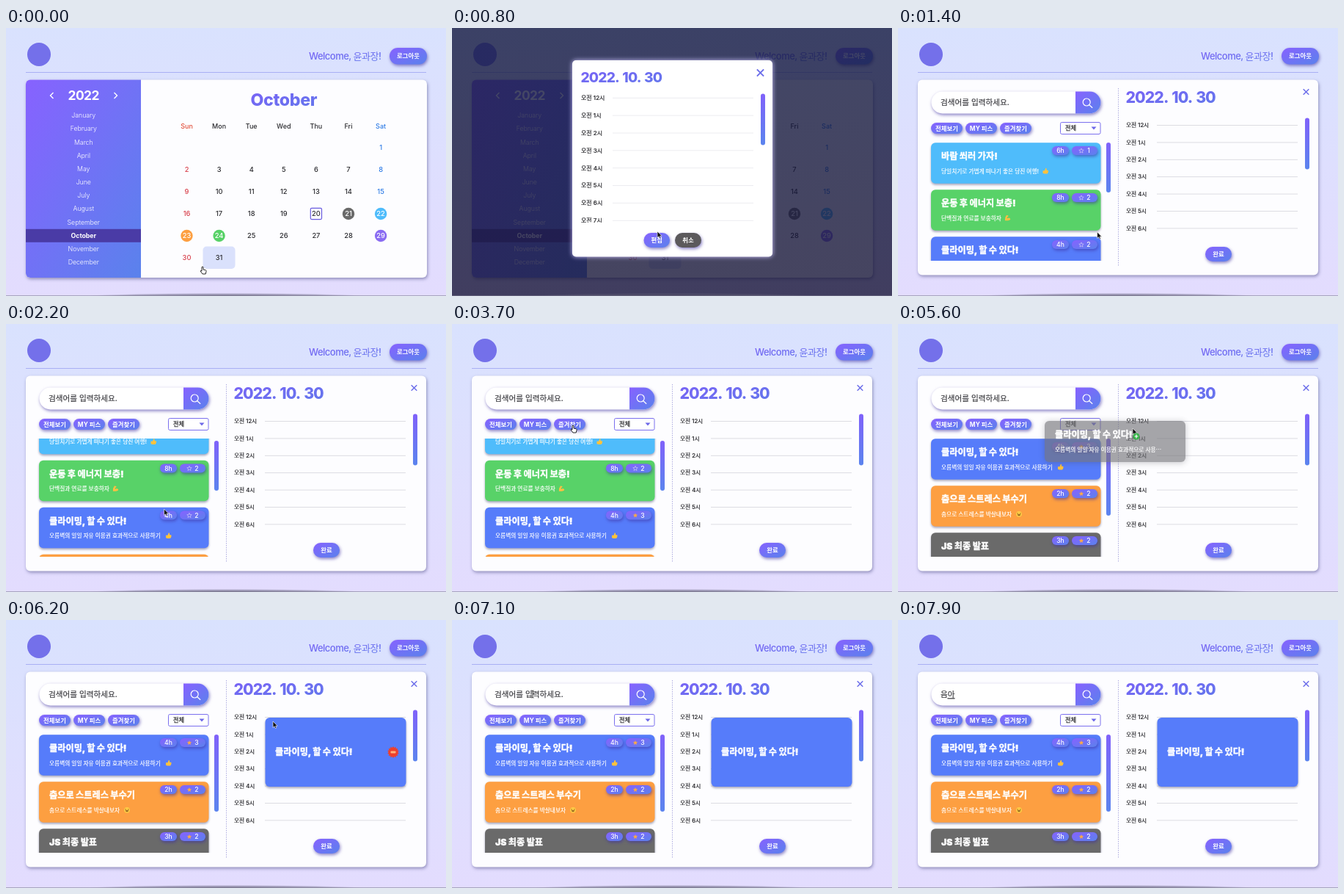
Write an HTML page that moves like this. It is 600 px wide and 365 px high and loops after 8000 ms.

```html
<!DOCTYPE html>
<html lang="ko">
<head>
<meta charset="utf-8">
<title>Planner</title>
<style>
html, body { margin: 0; width: 100%; height: 100%; overflow: hidden; }
body { background: linear-gradient(#d9e2fe, #e3dcfe); }
svg { display: block; position: absolute; left: 0; top: 0; }
text { font-family: Inter, "Noto Sans CJK KR", sans-serif; }
.lift { filter: drop-shadow(1.5px 2px 2.2px rgba(60, 45, 160, .6)); }
.card { filter: drop-shadow(0 2px 1.5px rgba(40, 40, 90, .4)); }
.panel { filter: drop-shadow(1px 2px 2px rgba(60, 60, 120, .5)); }
.glow { filter: drop-shadow(0 0 3px #cfc6ff); }
.haze { filter: drop-shadow(0 1px 4px rgba(60, 60, 70, .45)); }
.date { word-spacing: .1em; }
</style>
</head>
<body>
<svg id="stage" width="600" height="365" viewBox="0 0 600 365"></svg>
<script>
const LOOP = 8000;
const GRAD = 'url(#brand)', INK = '#2c2c30', USER = '윤과장';
const BLUE = '#567cfa', ORANGE = '#fd9f41', GRAY = '#6a6a6a', GREEN = '#58d268', SKY = '#4fbcfb';

const rect = (x, y, w, h, r, fill, more = '') =>
  `<rect x="${x}" y="${y}" width="${w}" height="${h}" rx="${r}" fill="${fill}" ${more}/>`;
const circle = (x, y, r, fill, more = '') =>
  `<circle cx="${x}" cy="${y}" r="${r}" fill="${fill}" ${more}/>`;
const path = (d, stroke, width = 1, more = '') =>
  `<path d="${d}" fill="none" stroke="${stroke}" stroke-width="${width}" ${more}/>`;
const shape = (d, fill, more = '') => `<path d="${d}" fill="${fill}" ${more}/>`;
const group = (body, more = '') => `<g ${more}>${body}</g>`;
// Text is placed by its optical middle line.
const text = (x, mid, str, size, weight = 400, fill = INK, anchor = 'start', gap = 0, more = '') =>
  `<text x="${x}" y="${mid + size * .36}" font-size="${size}" font-weight="${weight}" fill="${fill}" ` +
  `text-anchor="${anchor}" letter-spacing="${gap}" ${more}>${str}</text>`;
const label = (x, mid, str, size, weight, fill, gap) => text(x, mid, str, size, weight, fill, 'middle', gap);
// A thin outline gives Hangul the in-between weights.
const heavy = (x, mid, str, size, weight, fill, edge) =>
  text(x, mid, str, size, weight, fill, 'start', 0, `stroke="${fill}" stroke-width="${edge}"`);
const title = (x, mid, str) => heavy(x, mid, str, 12.2, 900, '#fff', .4);
const note = (x, mid, str) => heavy(x, mid, str, 7.7, 500, '#fff', .2);
const dateTitle = (x, mid, size) =>
  text(x, mid, '2022. 10. 30', size, 800, 'url(#head)', 'start', -size * .045, 'class="date"');
const pill = (x, y, w, h, str, size = 8.4, fill = GRAD) =>
  group(rect(x, y, w, h, h / 2, fill), 'class="lift"') + label(x + w / 2, y + h / 2, str, size, 700, '#fff');
const cross = (x, y, r, w) =>
  path(`M${x - r} ${y - r}l${2 * r} ${2 * r}M${x + r} ${y - r}l${-2 * r} ${2 * r}`, '#6c6eea', w);
const thumb = (x, y, h) => rect(x, y, 6, h, 3, 'url(#bar)');

function star(x, y, outer, inner, points) {
  let d = '';
  for (let i = 0; i < points * 2; i++) {
    const a = Math.PI * i / points - Math.PI / 2, r = i % 2 ? inner : outer;
    d += `${i ? 'L' : 'M'}${(x + r * Math.cos(a)).toFixed(2)} ${(y + r * Math.sin(a)).toFixed(2)}`;
  }
  return d + 'Z';
}

const emoji = {
  thumb: shape('M-3.5-.5H-1L.4-4Q2-4 1.5-1H3.6Q4.4 0 3.8 1.6L2.6 3.8H-1.4L-3.5 3Z', '#ffc23c'),
  arm: shape('M-3.6 3.4Q-4-1-1.6-3.8L1-3.4.6-1.8-.8-1.4-.4.6Q2.4-1.4 3.8 1.4 3 3.8-3.6 3.4Z', '#ffbf42'),
  face: circle(0, 0, 3.9, '#ffcb45') + path('M-2.4-1l1.4.6M2.4-1L1-.4M-1.8 1q1.8 2.4 3.6 0Z', '#6b4316', .8)
};

const hours = (x, y, step, n, size, x1, x2, line) => Array.from({ length: n }, (_, i) =>
  heavy(x, y + i * step, `오전 ${i || 12}시`, size, 500, INK, .2) +
  path(`M${x1} ${y + i * step}H${x2}`, line)).join('');

function badges(y, time, likes, liked) {
  const s = star(250, y + 6.2, 3.4, 1.5, 5);
  return group(rect(210, y, 23, 12, 6, GRAD) + rect(237, y, 35, 12, 6, GRAD), 'class="lift"') +
    label(221.5, y + 6, time, 8.6, 500, '#fff') +
    (liked ? shape(s, '#f8a84a') : path(s, '#cfc8f5', .7)) +
    label(260, y + 6, likes, 8.6, 500, '#fff');
}

function card(y, c, liked = c.liked) {
  const likes = c.likes + (liked && !c.liked ? 1 : 0);
  return group(rect(45, y, 231.5, 55.5, 6, c.fill), 'class="card"') +
    title(59, y + 18.5, c.title) + note(59, y + 38.8, c.sub) +
    group(emoji[c.icon], `transform="translate(${c.ix} ${y + 38.5})"`) +
    badges(y + 4.8, c.time, likes, liked);
}

const CLIMB = '클라이밍, 할 수 있다!', CLIMB_SUB = '오름벽의 일일 자유 이용권 효과적으로 사용';
const cards = [
  { fill: SKY, title: '바람 쐬러 가자!', sub: '당일치기로 가볍게 떠나기 좋은 당진 여행!', icon: 'thumb', ix: 201, time: '6h', likes: 1 },
  { fill: GREEN, title: '운동 후 에너지 보충!', sub: '단백질과 연료를 보충하자', icon: 'arm', ix: 149.5, time: '8h', likes: 2 },
  { fill: BLUE, title: CLIMB, sub: CLIMB_SUB + '하기', icon: 'thumb', ix: 221.5, time: '4h', likes: 2 },
  { fill: ORANGE, title: '춤으로 스트레스 부수기', sub: '춤으로 스트레스를 박살내보자', icon: 'face', ix: 165, time: '2h', likes: 2, liked: true },
  { fill: GRAY, title: 'JS 최종 발표', sub: '마지막까지 힘내자', icon: 'arm', ix: 130, time: '3h', likes: 2, liked: true }
];

const defs = `<defs>
  <linearGradient id="brand" x1="0" y1="0" x2="1" y2="1"><stop stop-color="#8762ff"/><stop offset="1" stop-color="#5a82ec"/></linearGradient>
  <linearGradient id="bar" x1="0" y1="0" x2="0" y2="1"><stop stop-color="#8062fa"/><stop offset="1" stop-color="#5b84ee"/></linearGradient>
  <linearGradient id="head" x1="0" y1="0" x2="1" y2="1"><stop stop-color="#7a62f6"/><stop offset="1" stop-color="#6278ec"/></linearGradient>
  <linearGradient id="dim" x1="0" y1="0" x2="0" y2="1"><stop stop-color="#141940" stop-opacity=".8"/><stop offset="1" stop-color="#181638" stop-opacity=".8"/></linearGradient>
  <radialGradient id="dock"><stop stop-color="#45435a" stop-opacity=".7"/><stop offset=".75" stop-color="#5c5a72" stop-opacity=".4"/><stop offset="1" stop-color="#77758c" stop-opacity="0"/></radialGradient>
  <clipPath id="listClip"><rect x="38" y="156" width="243" height="161"/></clipPath>
  <clipPath id="hourClip"><rect x="170" y="86" width="245" height="179"/></clipPath>
  <clipPath id="panelClip"><rect x="27" y="70.5" width="547" height="269.5" rx="6"/></clipPath>
</defs>`;

const header = circle(45, 36, 16, '#7470ea') +
  text(413, 38.3, `Welcome, ${USER}!`, 13, 500, 'url(#head)', 'start', -.5) +
  pill(523, 27, 51, 22.5, '로그아웃', 8.4) +
  path('M27 60.5H573', '#a9b0f4');

function calendar() {
  const months = 'January February March April May June July August September October November December'.split(' ');
  const days = 'Sun Mon Tue Wed Thu Fri Sat'.split(' ');
  const dots = { 21: GRAY, 22: SKY, 23: ORANGE, 24: GREEN, 29: '#8a6cf2' };
  const colX = i => 246.5 + 44.1 * i;
  const tint = i => i === 0 ? '#d8404c' : i === 6 ? '#2f7ce6' : INK;
  let s = group(rect(27, 70.5, 547, 269.5, 6, '#fdfdff'), 'class="panel"') +
    group(rect(27, 70, 157, 271, 0, GRAD) + rect(27, 273.8, 157, 18, 0, '#4a3ba6'), 'clip-path="url(#panelClip)"') +
    label(105.7, 92, '2022', 17.4, 700, '#fff', -.6) +
    path('M64.5 88l-4 4 4 4M147.5 88l4 4-4 4', '#fff', 1.4);
  months.forEach((m, i) => {
    s += label(105.8, 119 + 18.18 * i, m, 8.8, i === 9 ? 700 : 300, '#fff', -.05);
  });
  s += label(378.8, 97.5, 'October', 23.2, 800, 'url(#head)', -.35);
  s += rect(0, 297.5, 44, 30.5, 5, '#dae1fc', 'id="hover"');
  days.forEach((d, i) => { s += label(colX(i), 133.3, d, 9, 500, i ? tint(i) : '#e2503c'); });
  for (let n = 1; n <= 31; n++) {
    const i = (n + 5) % 7, x = colX(i), y = 163 + 30 * Math.floor((n + 5) / 7);
    if (dots[n]) s += circle(x, y, 8.2, dots[n]);
    if (n === 20) s += rect(x - 7.6, y - 7.6, 15.2, 15.2, 1.5, 'none', 'stroke="#6a5ce0" stroke-width="1.2"');
    s += label(x, y, n, 9.3, 450, dots[n] ? '#fff' : tint(i));
  }
  return s;
}

const modal = rect(0, 0, 600, 365, 0, 'url(#dim)') +
  group(rect(164, 44, 273, 267.5, 5, '#fff'), 'class="glow"') +
  dateTitle(175.5, 67.5, 19.2) + cross(420.5, 61, 4.6, 2) +
  group(hours(176, 95.3, 23.85, 8, 8, 219, 411, '#ececf0'), 'clip-path="url(#hourClip)"') +
  thumb(421, 89.5, 70) +
  pill(261.5, 279, 35.5, 20, '편집') + pill(304, 279, 36, 20, '취소', 8.4, '#5c5a5c');

const planner = group(rect(27, 70.5, 546, 266, 6, '#fdfdff'), 'class="panel"') +
  group(rect(45.5, 86.5, 231, 30, 15, '#fff'), 'class="lift"') +
  shape('M242 86.5H261.5A15 15 0 0 1 261.5 116.5H242Z', GRAD) +
  path('M262.2 101a5 5 0 1 1-10 0a5 5 0 1 1 10 0M260.8 104.8l4.4 4', '#fff', 1.2) +
  text(58, 101.5, '', 10.6, 400, '#3c3c40', 'start', 0, 'id="query" stroke="#3c3c40" stroke-width=".2"') +
  pill(45, 129, 43, 15, '전체보기') + pill(92, 129, 43, 15, 'MY 피스') + pill(139, 129, 43, 15, '즐겨찾기') +
  rect(221.5, 128.5, 54.5, 16, 2, '#fff', 'stroke="#7b70ee"') +
  heavy(228, 136.5, '전체', 8.2, 500, INK, .25) + shape('M263.5 134.5h7l-3.5 4Z', '#6d68e8') +
  group(group('', 'id="list"'), 'clip-path="url(#listClip)"') +
  group('', 'id="thumb"') +
  path('M300.5 82V325', '#9a97d8', .8, 'stroke-dasharray="1.5 1.5"') +
  dateTitle(310.5, 94, 21.2) + cross(556.5, 87, 3.8, 1.5) +
  hours(311, 132.5, 23.4, 7, 7.7, 353, 545, '#dcdce2') +
  thumb(555, 122.5, 70) + pill(419, 298, 36, 20, '완료') +
  group(
    group(rect(353.5, 133, 192, 94, 6, BLUE), 'class="card"') +
    title(367, 180, CLIMB) +
    group(shape(star(528, 180, 8, 6.2, 14), '#ee402c') + rect(524.5, 178.4, 7, 3, 1, '#ffb27a'), 'id="remove"'),
    'id="placed"');

const ghost = group(rect(0, 0, 192, 56, 6, '#747479'), 'class="haze" opacity=".64"') +
  title(14, 18.5, CLIMB) + note(14, 38.8, CLIMB_SUB + '⋯');

const pointers =
  shape('M0 0V8.6L2 6.8 3.3 9.6 4.8 9 3.6 6.3H6.2Z', '#111', 'id="arrow" stroke="#fff" stroke-width=".6"') +
  shape('M-1 .6Q0-.6 1 .6V4L4.4 4.8Q5.2 5.2 5 6.4L4.2 10H0L-3 6Q-2.6 4.8-1 6Z', '#fff', 'id="hand" stroke="#111" stroke-width=".9"') +
  path('M-1.5-5Q0-5 0-4V4Q0 5-1.5 5M1.5-5Q0-5 0-4M0 4Q0 5 1.5 5', '#222', .9, 'id="beam"') +
  group(circle(5, 11, 4.5, '#38b44a') + path('M2.6 11h4.8M5 8.6v4.8', '#fff', 1.2), 'id="plus"');

document.getElementById('stage').innerHTML = defs + header +
  group(calendar(), 'id="calendar"') + group(planner, 'id="planner"') +
  group(modal, 'id="modal"') + group(ghost, 'id="ghost"') +
  '<ellipse cx="300" cy="365" rx="190" ry="4" fill="url(#dock)"/>' + rect(0, 364.2, 600, .8, 0, '#7d7b90', 'opacity=".7"') +
  group(pointers, 'id="cursor"');

const el = id => document.getElementById(id);
const show = (id, on) => el(id).setAttribute('display', on ? 'inline' : 'none');
const move = (id, x, y) => el(id).setAttribute('transform', `translate(${x.toFixed(2)} ${y.toFixed(2)})`);
const ramp = (t, a, b) => {
  const k = Math.min(1, Math.max(0, (t - a) / (b - a)));
  return k * k * (3 - 2 * k);
};

// time, x, y, pointer from then on
const track = [
  [0, 268, 325, 'hand'], [60, 268, 325, 'hand'], [200, 256, 318, 'hand'], [380, 256, 318, 'arrow'],
  [800, 280, 277, 'arrow'], [950, 281, 285, 'hand'], [1300, 281, 285, 'arrow'], [1700, 222, 240, 'arrow'],
  [2200, 215.5, 252, 'arrow'], [2600, 250, 259, 'hand'], [3050, 250, 259, 'hand'], [3600, 165, 138, 'hand'],
  [4150, 165, 138, 'arrow'], [4600, 165, 166, 'arrow'], [4850, 165, 166, 'arrow'], [5600, 320, 142, 'arrow'],
  [5800, 364, 138, 'arrow'], [6300, 364, 138, 'arrow'], [6900, 110, 101, 'beam'], [LOOP, 110, 101, 'beam']
];
// time, finished text, composing text
const typing = [[7300, '', 'ㅇ'], [7420, '', '으'], [7540, '', '음'], [7680, '음', 'ㅇ'], [7800, '음', '아']];

const cache = {};
function fill(id, html) {
  if (cache[id] !== html) el(id).innerHTML = cache[id] = html;
}

function draw(t) {
  let i = 0;
  while (i < track.length - 2 && t >= track[i + 1][0]) i++;
  const [t0, x0, y0, kind] = track[i], [t1, x1, y1] = track[i + 1];
  const k = ramp(t, t0, t1), x = x0 + (x1 - x0) * k, y = y0 + (y1 - y0) * k;

  const editing = t >= 1300, filtered = t >= 3950, dragging = t >= 4850 && t < 5850;
  show('calendar', !editing);
  show('planner', editing);
  show('modal', t >= 300 && !editing);
  el('modal').setAttribute('opacity', ramp(t, 260, 650));
  el('hover').setAttribute('x', x >= 267.5 ? 268.5 : 224.5);

  const liked = t >= 2700, scroll = filtered ? 0 : ramp(t, 1650, 2150);
  const shown = filtered ? cards.slice(2) : cards;
  fill('list', shown.map((c, n) => card(156.3 + 64 * n, c, c.liked || (c.fill === BLUE && liked))).join(''));
  move('list', 0, -34.5 * scroll);
  fill('thumb', thumb(284, 156, filtered ? 105 : 68));
  move('thumb', 0, 3 * scroll);

  show('placed', t >= 5850);
  show('remove', x >= 353 && y >= 133);
  show('ghost', dragging);
  move('ghost', x - 120, y - 10);

  const step = typing.filter(s => t >= s[0]).pop();
  fill('query', step ? `${step[1]}<tspan text-decoration="underline">${step[2]}</tspan>` : '검색어를 입력하세요.');

  show('cursor', !step);
  move('cursor', x, y);
  for (const p of ['arrow', 'hand', 'beam']) show(p, p === kind);
  show('plus', dragging && x > 300);
}

const start = performance.now();
function tick() {
  draw((performance.now() - start) % LOOP);
  requestAnimationFrame(tick);
}
tick();
</script>
</body>
</html>
```
